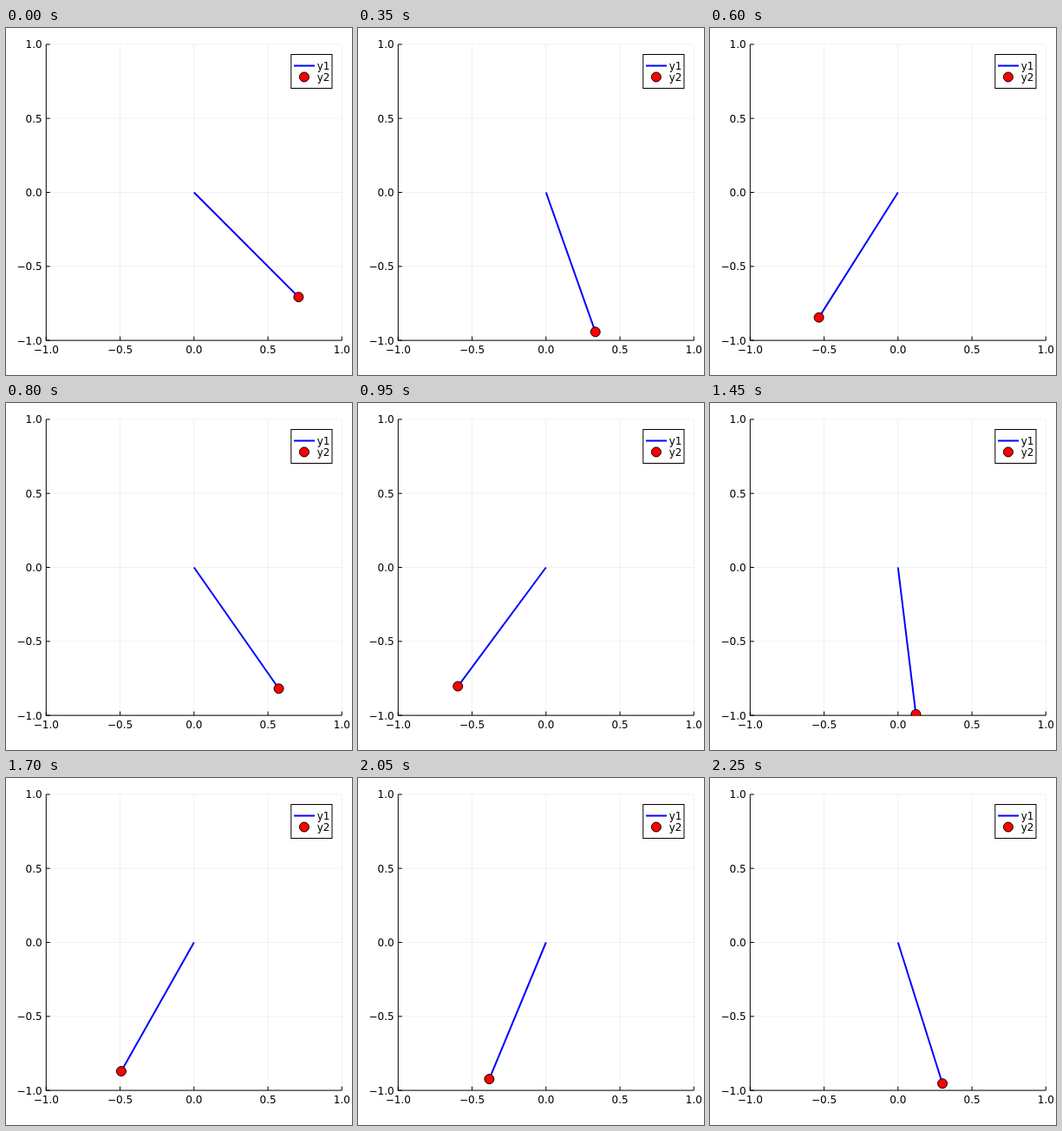
Recreate the animation shown at these times as an HTML page. Size 399x400 px, loop 2.3 s.

```html
<!DOCTYPE html>
<html lang="en">
<head>
<meta charset="utf-8">
<title>Damped pendulum</title>
<style>
  html, body { margin: 0; width: 100%; height: 100%; overflow: hidden; background: #fff; }
  svg { display: block; }
  text { font: 12px "DejaVu Sans", sans-serif; }
  .grid { stroke: #000; stroke-opacity: .06; }
  .axis { stroke: #000; fill: none; }
  .rod { stroke: #00f; stroke-width: 2; }
  .bob { fill: #f00; stroke: #000; }
</style>
</head>
<body>
<svg width="399" height="400" viewBox="0 0 399 400">
  <clipPath id="area"><rect x="46" y="18.5" width="341.5" height="342"/></clipPath>
  <g id="axes"></g>
  <g clip-path="url(#area)">
    <line id="rod" class="rod"/>
    <circle id="bob" class="bob" r="5.5"/>
  </g>
  <rect class="axis" x="328.8" y="30.5" width="47.2" height="39" style="fill:#fff"/>
  <line class="rod" x1="332" y1="43.5" x2="356" y2="43.5"/>
  <circle class="bob" cx="343.9" cy="56.5" r="5.5"/>
  <text x="358.7" y="47.8">y1</text>
  <text x="358.7" y="60.8">y2</text>
</svg>
<script>
const byId = id => document.getElementById(id);
const px = x => 216.8 + 170.5 * x;
const py = y => 189.5 - 170.6 * y;

function drawAxes() {
  const line = (cls, x1, y1, x2, y2) =>
    `<line class="${cls}" x1="${x1}" y1="${y1}" x2="${x2}" y2="${y2}"/>`;
  const left = px(-1), right = px(1), top = py(1), bottom = py(-1);
  let grid = "", ticks = "", labels = "";
  for (const v of [-1, -0.5, 0, 0.5, 1]) {
    const x = px(v), y = py(v), label = v.toFixed(1).replace("-", "\u2212");
    grid += line("grid", x, top, x, bottom) + line("grid", left, y, right, y);
    ticks += line("axis", x, bottom, x, bottom - 4.5) + line("axis", left, y, left + 4.5, y);
    labels += `<text x="${x}" y="374.6" text-anchor="middle">${label}</text>` +
              `<text x="41.7" y="${y + 4.4}" text-anchor="end">${label}</text>`;
  }
  ticks += line("axis", left, top, left, bottom + 0.5) + line("axis", left, bottom, right, bottom);
  byId("axes").innerHTML = grid + ticks + labels;
}

// Pendulum with gravity 9.81, length 1 and damping 0.1; state is [angle, speed].
const slope = ([a, w]) => [w, -9.81 * Math.sin(a) - 0.1 * w];

// Tsitouras 5(4) tableau; the last stage row is also the solution.
const STAGES = [
  [0.161],
  [-0.008480655492356989, 0.335480655492357],
  [2.8971530571054935, -6.359448489975075, 4.3622954328695815],
  [5.325864828439257, -11.748883564062828, 7.4955393428898365, -0.09249506636175525],
  [5.86145544294642, -12.92096931784711, 8.159367898576159, -0.071584973281401, -0.028269050394068383],
  [0.09646076681806523, 0.01, 0.4798896504144996, 1.379008574103742, -3.290069515436081, 2.324710524099774]
];
const ERROR = [-0.001780011052225777, -0.0008164344596567469, 0.007880878010261995,
  -0.1447110071732629, 0.5823571654525552, -0.45808210592918697, 1 / 66];
const ABS_TOL = 1e-6, REL_TOL = 1e-3;

const mix = (row, k, i) => row.reduce((sum, c, j) => sum + c * k[j][i], 0);
const norm = (v, size) =>
  Math.hypot(...v.map((e, i) => e / (ABS_TOL + REL_TOL * size[i]))) / Math.SQRT2;

function tryStep(u, dt) {
  const k = [slope(u)];
  let next;
  for (const row of STAGES) {
    next = u.map((v, i) => v + dt * mix(row, k, i));
    k.push(slope(next));
  }
  const error = u.map((_, i) => dt * mix(ERROR, k, i));
  const size = u.map((v, i) => Math.max(Math.abs(v), Math.abs(next[i])));
  return { next, err: norm(error, size) };
}

// One pose per accepted adaptive step, so the pace follows the step size.
function solve(u, end) {
  const angles = [u[0]];
  const size = u.map(Math.abs);
  let t = 0, lastErr = 1e-4;
  let dt = norm(u, size) / norm(slope(u), size);
  while (end - t > 1e-9) {
    dt = Math.min(dt, end - t);
    const { next, err } = tryStep(u, dt);
    const q = err ** 0.14;
    if (err > 1) {
      dt /= Math.min(5, q / 0.9);
      continue;
    }
    t += dt;
    u = next;
    angles.push(u[0]);
    dt /= Math.max(0.1, Math.min(5, q / lastErr ** 0.08 / 0.9));
    lastErr = Math.max(err, 1e-4);
  }
  return angles;
}

const LOOP = 2300, FRAME = 50;
const angles = solve([Math.PI / 4, 0], 10);
const rod = byId("rod"), bob = byId("bob");

function set(el, attrs) {
  for (const name in attrs) el.setAttribute(name, attrs[name]);
}

function draw() {
  const step = Math.floor((performance.now() % LOOP) / FRAME + 1e-6);
  const a = angles[Math.min(step, angles.length - 1)];
  const x = px(Math.sin(a)), y = py(-Math.cos(a));
  set(rod, { x2: x, y2: y });
  set(bob, { cx: x, cy: y });
  requestAnimationFrame(draw);
}

drawAxes();
set(rod, { x1: px(0), y1: py(0) });
draw();
</script>
</body>
</html>
```
